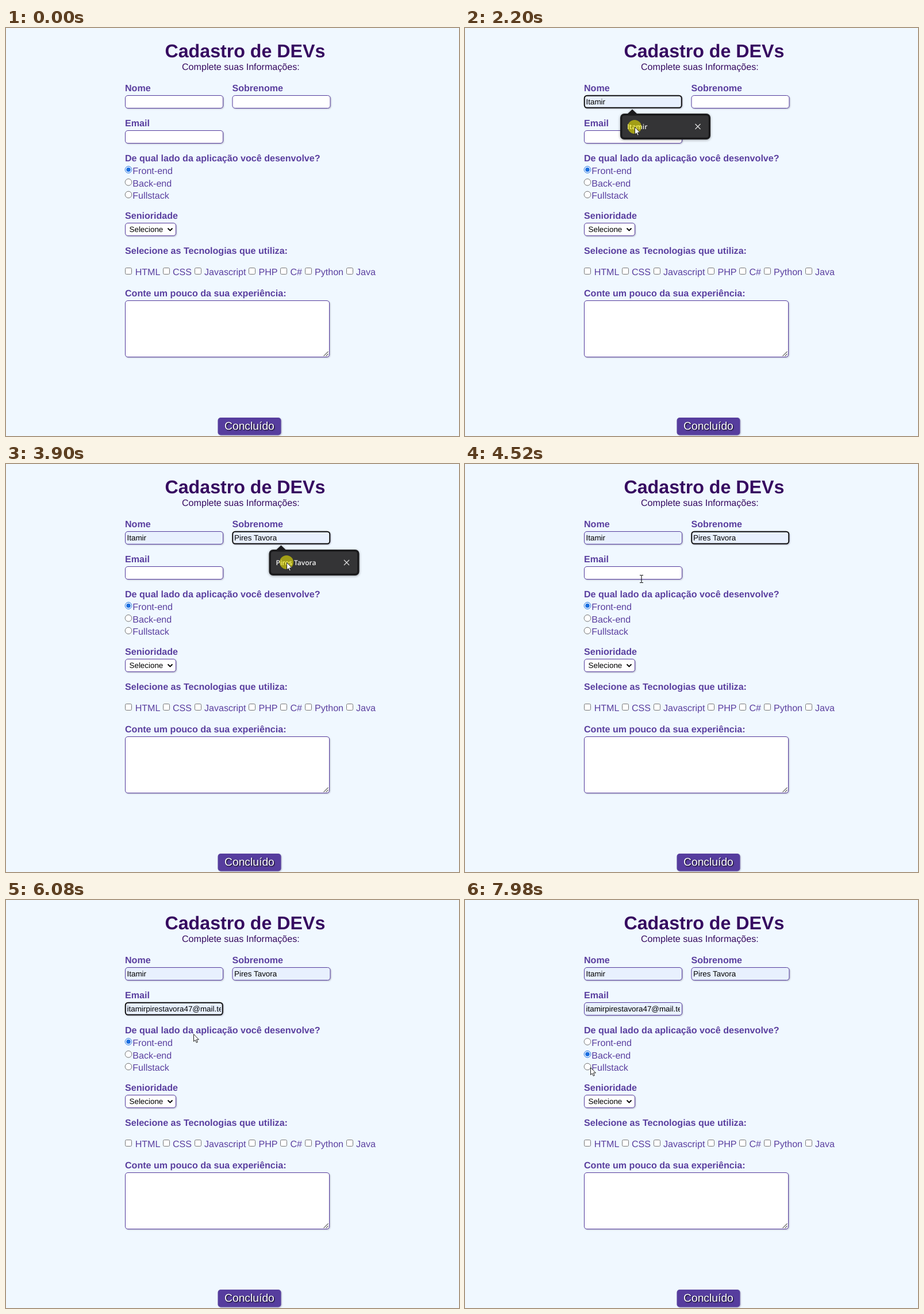
Write an HTML page that moves like this. It is 788 px wide and 710 px high and loops after 8 s.

```html
<!DOCTYPE html>
<html lang="pt-BR">
<head>
<meta charset="utf-8">
<title>Cadastro de DEVs</title>
<style>
html, body { margin: 0; width: 100%; height: 100%; overflow: hidden; background: #f0f8ff; }
svg { display: block; font: 16.08px "Liberation Sans", Arial, sans-serif; fill: #5a3f9f; text-rendering: geometricPrecision; }
.title { font-size: 32.16px; font-weight: bold; fill: #360a60; }
.sub { fill: #360a60; }
.label { font-weight: bold; }
.value { font-size: 13.4px; fill: #000; }
.box { fill: #fff; stroke: #563d9e; filter: drop-shadow(1.5px 1.5px 1.2px rgba(40, 30, 70, .32)); }
.box.focus { stroke: #101010; stroke-width: 2; }
.mark { fill: #fff; stroke: #767676; }
.button { fill: #563d9e; stroke: none; }
.send { font-size: 19.3px; fill: #fff; text-shadow: 1px 1px 2px #000; }
.popup { fill: #1b1b1d; filter: drop-shadow(0 1px 2px rgba(0, 0, 0, .4)); }
.row { fill: #343436; }
.item { font: 600 12px "Open Sans", "Noto Sans", sans-serif; fill: #f2f2f2; }
.line { fill: none; stroke: #000; }
</style>
</head>
<body>
<svg id="stage" width="788" height="710" viewBox="0 0 788 710"></svg>
<script>
const LOOP = 8000;
const stage = document.getElementById('stage');

function add(tag, attrs, text = '', parent = stage) {
  const el = document.createElementNS('http://www.w3.org/2000/svg', tag);
  set(el, attrs);
  el.textContent = text;
  return parent.appendChild(el);
}
function set(el, attrs) {
  for (const key in attrs) el.setAttribute(key, attrs[key]);
}
function show(el, on) {
  el.style.display = on ? '' : 'none';
}
const write = (x, y, text, cls = '', parent = stage) => add('text', { x, y, class: cls }, text, parent);
const box = (x, y, width, height, cls = 'box', rx = 4.5, parent = stage) =>
  add('rect', { x, y, width, height, rx, class: cls }, '', parent);

// Static form
write(276.5, 51, 'Cadastro de DEVs', 'title');
write(306, 73, 'Complete suas Informações:', 'sub');
[
  [207, 110, 'Nome'], [393.5, 110, 'Sobrenome'], [207, 171, 'Email'],
  [207, 232, 'De qual lado da aplicação você desenvolve?'],
  [207, 332, 'Senioridade'],
  [207, 393, 'Selecione as Tecnologias que utiliza:'],
  [207, 467, 'Conte um pouco da sua experiência:']
].forEach(([x, y, text]) => write(x, y, text, 'label'));

const radios = [['Front-end', 246.5, 253.5], ['Back-end', 268.3, 275.5], ['Fullstack', 290, 297]]
  .map(([text, cy, base]) => {
    write(220.3, base, text);
    return {
      ring: add('circle', { cx: 213, cy, r: 5.8, class: 'mark' }),
      dot: add('circle', { cx: 213, cy, r: 3.8, fill: '#1a6fe0' })
    };
  });

box(207.5, 339.5, 88, 22);
write(214.5, 355, 'Selecione', 'value');
add('path', { d: 'M281.5 348.5l4 4 4-4', class: 'line', 'stroke-width': 1.8 });

[['HTML', 207, 224.7], ['CSS', 273, 290], ['Javascript', 328, 345], ['PHP', 422, 439.5],
 ['C#', 477, 494.5], ['Python', 520, 537], ['Java', 592, 609]].forEach(([text, x, tx]) => {
  box(x + .5, 417.5, 11, 11, 'mark', 2);
  write(tx, 430, text);
});

box(207.5, 474.5, 355, 98);
add('path', { d: 'M552.5 571l8-8M556.5 571l4-4', class: 'line', stroke: '#333' });
box(368.5, 678, 110, 30.5, 'box button', 5);
write(380, 699, 'Concluído', 'send');

// Text fields: focus span, suggestion span and the moment the value appears
const fields = [
  { x: 207, y: 117, text: 'Itamir', focus: [1190, 2950], popup: [1260, 2270], fill: 1790, px: 270, py: 149, pw: 157 },
  { x: 393.5, y: 117, text: 'Pires Tavora', focus: [2950, 4720], popup: [3020, 3970], fill: 3600, px: 457.5, py: 149, pw: 157 },
  { x: 207, y: 178, text: 'itamirpirestavora47@mail.test', focus: [4720, 6900], popup: [4850, 5900], fill: 5460, px: 270, py: 209, pw: 236 }
];

fields.forEach((f, i) => {
  f.rect = box(f.x + .5, f.y + .5, 170, 22);
  const clip = add('clipPath', { id: 'clip' + i });
  box(f.x + 3, f.y, 164, 23, '', 0, clip);
  f.value = write(f.x + 3.5, f.y + 16, f.text, 'value');
  set(f.value, { 'clip-path': `url(#clip${i})` });
});
const caret = add('path', { d: 'M211.5 121v15', class: 'line' });

fields.forEach(f => {
  const { px, py, pw } = f;
  f.menu = add('g', {});
  const back = add('g', { class: 'popup' }, '', f.menu);
  box(px, py, pw, 45, '', 7, back);
  add('path', { d: `M${px + 12} ${py + 1}l9-8.5 9 8.5z` }, '', back);
  f.hover = add('g', {}, '', f.menu);
  box(px + 3.5, py + 3.5, pw - 7, 38, 'row', 4, f.hover);
  add('path', { d: `M${px + pw - 26.5} ${py + 18}l9 9m0-9l-9 9`, class: 'line', style: 'stroke:#ddd;stroke-width:1.3' }, '', f.hover);
  write(px + 12, py + 27, f.text, 'item', f.menu);
});

// Pointer
const halo = add('circle', { r: 12, fill: '#f6f000', opacity: .57 });
const arrow = add('path', { d: 'M.5 .5V13.2L3.3 10.7 5.3 15.2 7.3 14.3 5.4 9.9H9.4Z', fill: '#fff', stroke: '#222', 'stroke-width': 1 });
const beam = add('path', { d: 'M-3-6.5h2.5l.5.5.5-.5H3M0-6V6M-3 6.5h2.5l.5-.5.5.5H3', class: 'line' });

// First change, last change, number of steps, end point, optional control point
const moves = [
  [110, 870, 12, [244, 126], [300, -240]],
  [930, 1000, 2, [260, 132]],
  [1520, 1930, 7, [295, 172]],
  [2270, 2810, 9, [421, 131]],
  [3220, 3760, 9, [488, 171]],
  [4050, 4520, 7, [307, 200]],
  [5320, 5600, 5, [326, 233]],
  [6150, 6560, 6, [217, 267]],
  [6630, 6630, 1, [216, 270]],
  [7040, 7240, 3, [215, 290]],
  [7440, 7650, 4, [218, 291]]
];
const clicks = [[1190, 1320], [2200, 2270], [2950, 3020], [3900, 3970], [4720, 4850], [5800, 5900], [6900, 7040]];
const within = (t, [a, b]) => t >= a && t < b;

function pointer(t) {
  let pos = [750, 670];
  for (const [start, end, steps, to, ctrl] of moves) {
    if (t < start) break;
    const k = t >= end ? 1 : (Math.floor((t - start) / (end - start) * (steps - 1)) + 1) / steps;
    const s = ctrl ? k : k * k * (3 - 2 * k);
    pos = pos.map((p, i) => {
      const c = ctrl ? ctrl[i] : (p + to[i]) / 2;
      return (1 - s) ** 2 * p + 2 * s * (1 - s) * c + s * s * to[i];
    });
  }
  return pos;
}

function draw(t) {
  for (const f of fields) {
    const focused = within(t, f.focus), filled = t >= f.fill, shrink = focused ? 1 : 0;
    const inset = focused ? .75 : .5;
    set(f.rect, {
      class: focused ? 'box focus' : 'box',
      x: f.x + inset, y: f.y + inset, width: 170 - shrink, height: 22 - shrink,
      style: `fill:${filled ? '#e8f0fe' : focused ? '#e0e0f7' : '#fff'}`
    });
    show(f.value, filled);
    show(f.menu, within(t, f.popup));
    show(f.hover, filled);
  }
  show(caret, within(t, [1190, 1720]));

  const chosen = t < 6900 ? 0 : 1;
  radios.forEach((r, i) => {
    r.ring.style.stroke = i === chosen ? '#1a6fe0' : '';
    show(r.dot, i === chosen);
  });

  const [x, y] = pointer(t);
  const typing = fields.some(f => x > f.x && x < f.x + 171 && y > f.y && y < f.y + 23);
  const place = { transform: `translate(${x} ${y})` };
  [halo, arrow, beam].forEach(el => set(el, place));
  show(halo, clicks.some(c => within(t, c)));
  show(arrow, t >= 110 && !typing);
  show(beam, t >= 110 && typing);
}

const begin = performance.now();
function tick() {
  draw((performance.now() - begin) % LOOP);
  requestAnimationFrame(tick);
}
tick();
</script>
</body>
</html>
```
